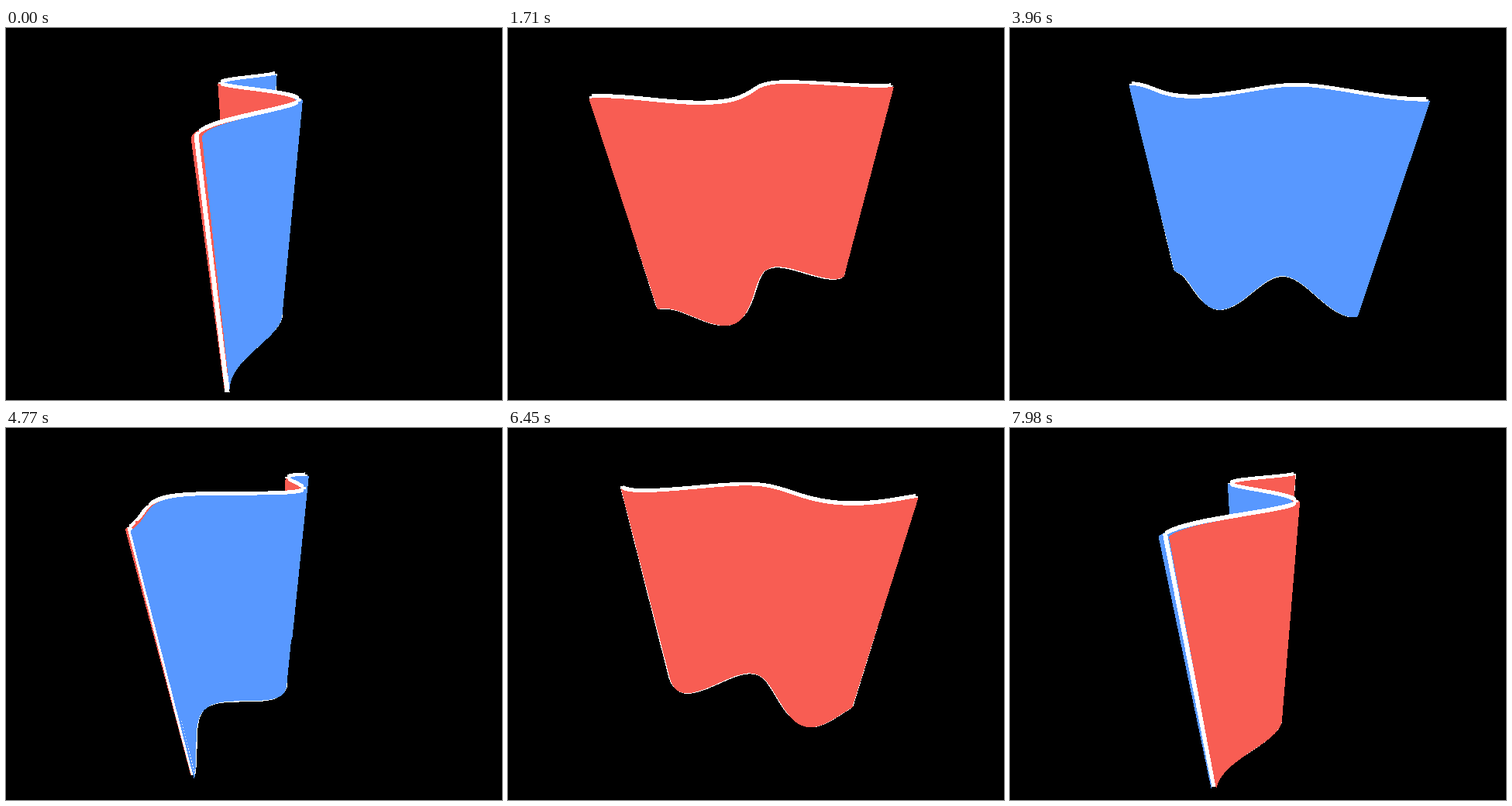
Write an HTML page with a canvas that moves like this. It is 640 px wide and 480 px high and loops after 8000 ms.

```html
<!DOCTYPE html>
<html lang="en">
<head>
<meta charset="utf-8">
<title>Waving sheet</title>
<style>
html, body { margin: 0; width: 100%; height: 100%; overflow: hidden; background: #000; }
canvas { display: block; }
</style>
</head>
<body>
<canvas id="stage" width="640" height="480"></canvas>
<script>
const W = 640, H = 480, LOOP = 8000, STEP = 30;
const FOCAL = H / 2 / Math.tan(35 * Math.PI / 180);
const CAM_Y = 1.3, CAM_Z = 1.95;
const CAM_D = Math.hypot(CAM_Y, CAM_Z), SIN = CAM_Y / CAM_D, COS = CAM_Z / CAM_D;
const COLS = 96, AMP = 0.25, GAP = 0.02, LINE = 6;
const SHEET_X = 1.005, BORDER_X = 0.99, DROP = 0.006;

// Pixels are packed as ABGR
const BLACK = 0xff000000, WHITE = 0xffffffff, RED = 0xff535df8, BLUE = 0xffff9858;

const ctx = document.getElementById('stage').getContext('2d');
const image = ctx.createImageData(W, H);
const pixels = new Uint32Array(image.data.buffer);
const depth = new Float32Array(W * H);

let turn = 0, phase = 0;

function project(x, y, offset) {
  const z = offset - AMP * Math.sin(1.5 * Math.PI * x + phase);
  const wx = x * Math.cos(turn) + z * Math.sin(turn);
  const away = CAM_Z + x * Math.sin(turn) - z * Math.cos(turn);
  const down = CAM_Y - y;
  const inv = 1 / (COS * away + SIN * down);
  return {
    x: W / 2 + FOCAL * wx * inv,
    y: H / 2 + FOCAL * (COS * down - SIN * away) * inv,
    inv
  };
}

function plot(x, y, inv, color) {
  if (x < 0 || y < 0 || x >= W || y >= H) return;
  const i = y * W + x;
  if (inv > depth[i]) {
    depth[i] = inv;
    pixels[i] = color;
  }
}

function fillQuad(points, color) {
  const [a, b, c] = points;
  const bx = b.x - a.x, by = b.y - a.y, cx = c.x - a.x, cy = c.y - a.y;
  const area = bx * cy - by * cx;
  if (Math.abs(area) < 1e-6) return;
  const db = b.inv - a.inv, dc = c.inv - a.inv;
  const gx = (db * cy - dc * by) / area, gy = (dc * bx - db * cx) / area;
  const ys = points.map(p => p.y);
  const top = Math.max(0, Math.ceil(Math.min(...ys) - 0.5));
  const end = Math.min(H - 1, Math.floor(Math.max(...ys) - 0.5));
  for (let y = top; y <= end; y++) {
    const row = y + 0.5;
    let left = Infinity, right = -Infinity;
    for (let i = 0; i < 4; i++) {
      const p = points[i], q = points[(i + 1) % 4];
      if ((p.y <= row) === (q.y <= row)) continue;
      const x = p.x + (q.x - p.x) * (row - p.y) / (q.y - p.y);
      left = Math.min(left, x);
      right = Math.max(right, x);
    }
    const last = Math.floor(right - 0.5);
    for (let x = Math.ceil(left - 0.5); x <= last; x++) {
      plot(x, y, a.inv + gx * (x + 0.5 - a.x) + gy * (row - a.y), color);
    }
  }
}

// Thickness is measured across the minor axis of the segment
function drawLine(p, q, color) {
  const flat = Math.abs(q.x - p.x) > Math.abs(q.y - p.y);
  const major = flat ? 'x' : 'y', minor = flat ? 'y' : 'x';
  if (p[major] > q[major]) [p, q] = [q, p];
  const span = q[major] - p[major];
  if (!span) return;
  const last = Math.floor(q[major] - 0.5);
  for (let m = Math.ceil(p[major] - 0.5); m <= last; m++) {
    const k = (m + 0.5 - p[major]) / span;
    const start = Math.round(p[minor] + (q[minor] - p[minor]) * k - LINE / 2);
    const inv = p.inv + (q.inv - p.inv) * k;
    for (let s = start; s < start + LINE; s++) {
      if (flat) plot(m, s, inv, color);
      else plot(s, m, inv, color);
    }
  }
}

function drawSheet(offset, color) {
  const pair = x => [project(x, 1 - DROP, offset), project(x, -1 - DROP, offset)];
  let [top, bottom] = pair(-SHEET_X);
  for (let i = 1; i <= COLS; i++) {
    const [nextTop, nextBottom] = pair(SHEET_X * (2 * i / COLS - 1));
    fillQuad([top, nextTop, nextBottom, bottom], color);
    top = nextTop;
    bottom = nextBottom;
  }
}

function drawBorder() {
  for (const y of [1, -1]) {
    let prev = project(-BORDER_X, y, 0);
    for (let i = 1; i <= COLS; i++) {
      const next = project(BORDER_X * (2 * i / COLS - 1), y, 0);
      drawLine(prev, next, WHITE);
      prev = next;
    }
  }
  for (const x of [-BORDER_X, BORDER_X]) drawLine(project(x, 1, 0), project(x, -1, 0), WHITE);
}

function render(n) {
  turn = (2 * n - 87.7) * Math.PI / 180;
  phase = 0.18 + 0.33 * n;
  pixels.fill(BLACK);
  depth.fill(0);
  drawSheet(GAP, RED);
  drawSheet(-GAP, BLUE);
  drawBorder();
  ctx.putImageData(image, 0, 0);
}

let shown = -1;
const begin = performance.now();

function tick() {
  const n = Math.floor((performance.now() - begin) % LOOP / STEP);
  if (n !== shown) render(shown = n);
  requestAnimationFrame(tick);
}
tick();
</script>
</body>
</html>
```
